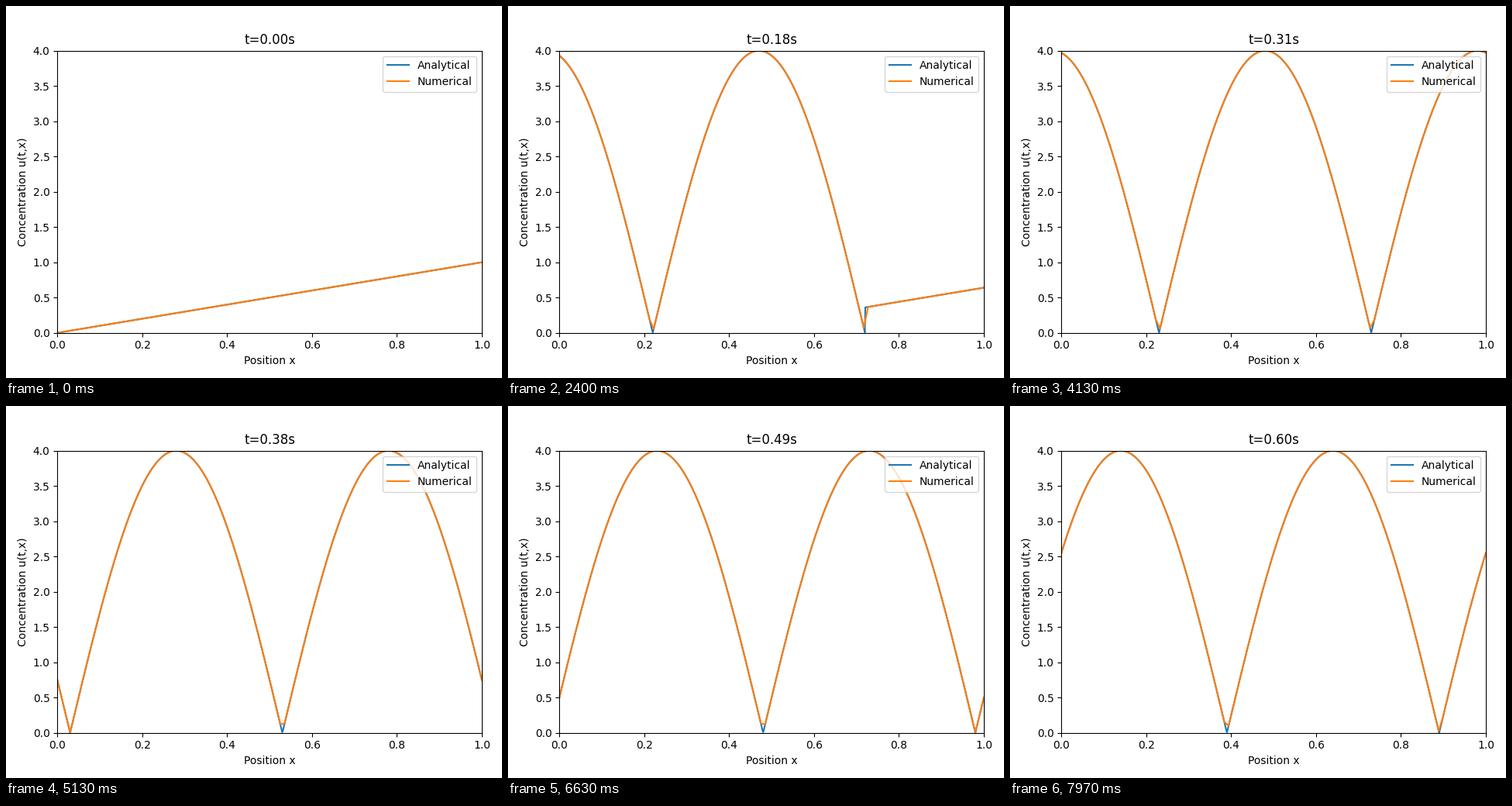
These frames come from a looping animation (640 by 480 pixels, 8000 ms). A matplotlib script:

```python
import numpy as np
import matplotlib.pyplot as plt
from matplotlib.animation import FuncAnimation

FRAMES = 240
LOOP_MS = 8000
DT = 0.0025
SPEED = 4.0
PEAK = 4.0


def concentration(t, x):
    """Wave entering from the left; ahead of its front the ramp sinks."""
    s = round(SPEED * t, 9) - x
    wave = PEAK * np.abs(np.sin(2 * np.pi * s))
    return np.where(s >= 0, wave, x - 2 * t)


fine = np.linspace(0, 1, 1000)
coarse = np.linspace(0, 1, 100)

fig, ax = plt.subplots(figsize=(6.4, 4.8), dpi=100)
curves = [
    (ax.plot(fine, fine, label="Analytical")[0], fine),
    (ax.plot(coarse, coarse, label="Numerical")[0], coarse),
]
ax.set_xlim(0, 1)
ax.set_ylim(0, 4)
ax.set_xlabel("Position x")
ax.set_ylabel("Concentration u(t,x)")
title = ax.set_title("t=0.00s")
ax.legend(loc="upper right")
fig.tight_layout()
fig.subplots_adjust(top=0.88)


def update(i):
    t = i * DT
    for line, x in curves:
        line.set_ydata(concentration(t, x))
    title.set_text(f"t={t:.2f}s")
    return [line for line, _ in curves] + [title]


anim = FuncAnimation(fig, update, frames=FRAMES, interval=LOOP_MS / FRAMES,
                     repeat=True, repeat_delay=0, blit=False)
plt.show()
```
